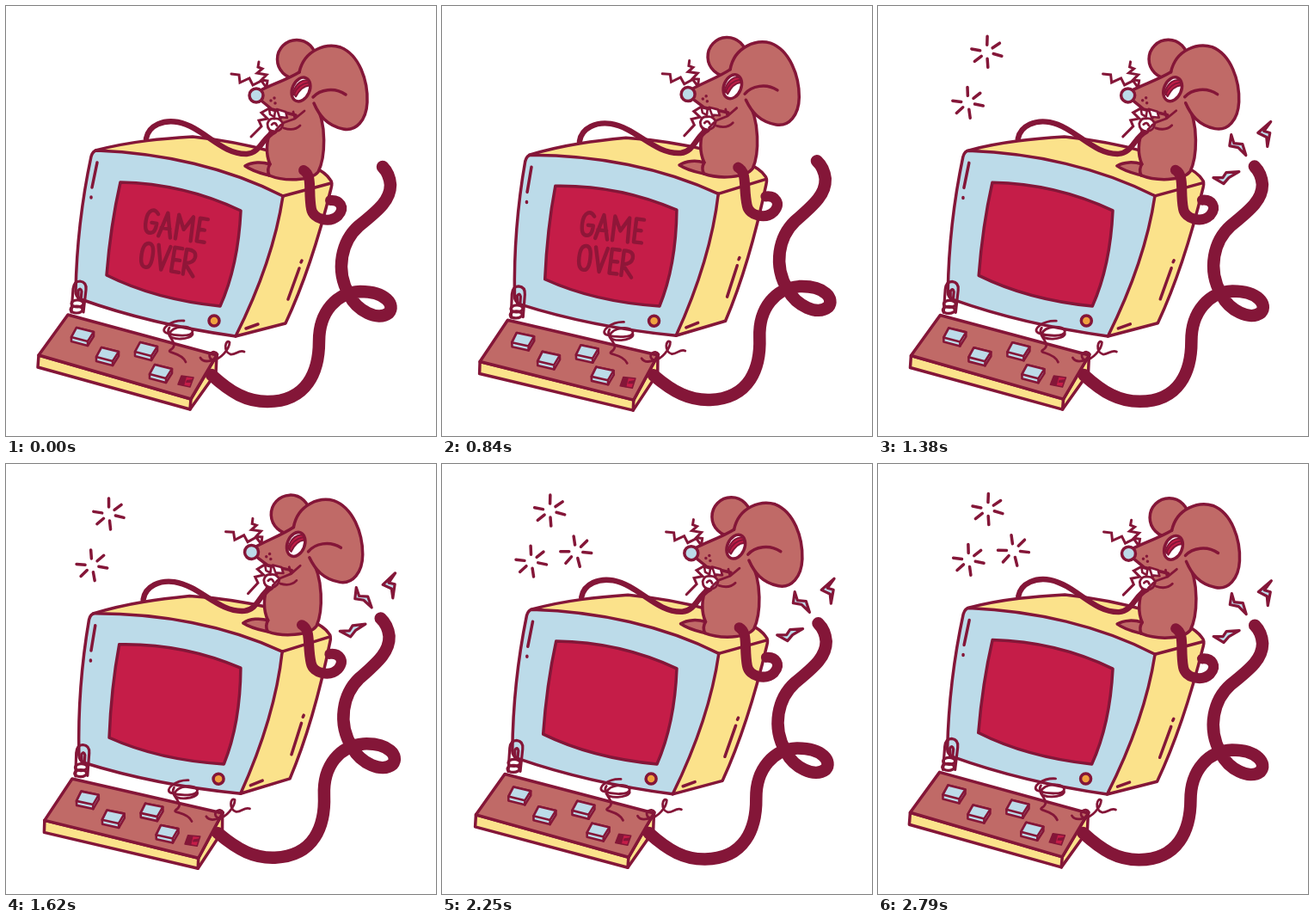
These frames come from a looping animation (500x500 px, 2820 ms). An HTML page:

```html
<!DOCTYPE html>
<html lang="en">
<head>
<meta charset="utf-8">
<title>Game over</title>
<style>
  html, body { margin: 0; width: 100%; height: 100%; overflow: hidden; background: #fff; }
  svg { display: block; width: 100vw; height: 100vh; }
  .line { fill: none; }
  .blue { fill: #bcdbe9; }
  .yellow { fill: #fbe28b; }
  .fur { fill: #c06a67; }
  .red { fill: #c51d48; }
  .white { fill: #fff; }
  .dark { fill: #841638; stroke: none; }
</style>
</head>
<body>
<svg viewBox="0 0 500 500">
<defs>
  <g id="key">
    <path class="blue" d="M-7-10L13-5V0L6 11L-13 6V1Z"/>
    <path class="blue" d="M-7-10L13-5L6 6L-13 1ZM6 6V11"/>
  </g>
  <clipPath id="cut"><path d="M-10-10H16V40H-10ZM16-10H90V24H16Z"/></clipPath>
</defs>
<g id="scene" stroke="#841638" stroke-width="3.5" stroke-linecap="round" stroke-linejoin="round">

  <!-- monitor -->
  <path class="yellow" d="M104 168C145 157 185 154 217 152C275 158 362 178 377 202Q380 205 378 212C364 269 347 322 325 369L267 384L322 221Z"/>
  <path class="line" d="M322 221L378 206"/>
  <path class="blue" d="M106 168Q101 168 99 175C89 222 82 280 81 332Q81 338 87 341C140 360 203 375 267 384C292 334 313 281 322 221C258 188 182 171 106 168Z"/>
  <path class="red" d="M133 205C184 206 231 218 273 238C271 280 263 318 249 349C200 344 155 332 117 313C120 275 125 240 133 205Z"/>
  <path class="line" d="M106 182L100 211M99 222V223M341 305L328 341M344 296L343 298M279 375L293 370"/>
  <circle cx="242" cy="366" r="6" fill="#efa23f"/>

  <!-- hand lettering -->
  <g id="words" class="line" role="img" aria-label="GAME OVER" stroke="#8f1638" stroke-width="4.4">
    <g transform="translate(165 235) rotate(9)">
      <path id="game" d="M13 5Q9 0 5 2Q0 5 0 15Q0 29 7 28Q13 28 13 16H7M17 30L24 2L31 30M19 20H29M37 30V2L45 18L54 2L55 30M71 2H62V29H71M62 15H69"/>
    </g>
    <g transform="translate(160 274) rotate(9)">
      <path id="over" d="M7 1Q0 1 0 15Q0 29 7 29Q13 29 13 15Q13 1 7 1M18 1L25 29L32 1M46 1H37V29H46M37 15H45M51 30V1Q63 0 62 9Q61 16 51 17L63 31"/>
    </g>
  </g>

  <!-- keyboard -->
  <path class="yellow" d="M38 406L215 457L245 406L244 427L214 469L37 420Z"/>
  <path class="fur" d="M72 359L245 406L215 457L38 406Z"/>
  <path class="line" d="M215 457L214 469"/>
  <g stroke-width="2.6">
    <use href="#key" x="89" y="384"/>
    <use href="#key" x="118" y="407"/>
    <use href="#key" x="163" y="401"/>
    <use href="#key" x="180" y="427"/>
  </g>
  <path class="red" stroke-width="1.6" d="M204 430L218 432L214 443L200 440Z"/>
  <path class="dark" d="M204 430L210 431L207 442L200 440ZM210 435L217 434L215 438L209 438Z"/>

  <!-- loose wires -->
  <g class="line" stroke-width="3.2">
    <path d="M76 356L78 329Q79 320 86 320Q94 321 93 330L90 356M84 341V331Q87 327 88 332L87 342"/>
    <ellipse cx="83" cy="346" rx="7" ry="4"/>
    <ellipse cx="82" cy="353" rx="7" ry="4"/>
    <path stroke-width="2.8" d="M207 366C192 365 178 376 186 380C197 384 217 385 217 378C214 370 194 372 190 381C189 390 217 388 217 381M190 374C183 384 204 392 191 400C186 404 204 402 209 414"/>
    <path stroke-width="2.8" d="M226 409C230 416 245 413 246 405C242 398 232 406 239 411C249 413 260 398 260 391C255 387 252 402 261 405C267 406 271 399 277 402"/>
  </g>
  <path class="line" stroke-width="14.5" d="M239 429C262 450 280 460 304 460C350 460 364 425 364 390C364 355 385 333 412 332C442 332 453 348 445 357C432 367 408 354 399 336C382 306 391 273 410 256C435 236 447 225 447 208Q446 195 438 187"/>

  <!-- mouse -->
  <circle class="fur" cx="338" cy="62" r="22.5"/>
  <path class="fur" d="M309 142C302 157 302 173 307 184C298 181 286 181 278 186C288 193 299 195 306 197C323 204 354 204 363 193C371 177 374 137 359 112L335 112Z"/>
  <path class="line" d="M307 184Q303 190 306 197"/>
  <path class="fur" stroke="none" d="M294 99C312 90 327 85 342 76L374 88L358 119L343 128L309 121L298 111Z"/>
  <path class="fur" d="M341 77C347 50 373 43 389 48C411 57 421 87 420 112C419 133 407 146 392 143C373 139 364 127 358 113"/>
  <path class="line" d="M296 98C310 91 328 85 341 77M357 106C365 97 382 94 395 103M298 111L309 120L337 127"/>
  <g transform="rotate(24 343 97)">
    <ellipse class="white" cx="343" cy="97" rx="10" ry="14.5"/>
    <path class="red" stroke-width="2" d="M336 104C335 92 340 85 347 84L350 89Q342 93 341 107Z"/>
    <path class="line" stroke-width="2" d="M338 106Q337 93 348 86"/>
  </g>
  <circle class="blue" cx="291" cy="104" r="8"/>
  <path class="line" d="M308 110V110M313 113V113M312 107V107"/>
  <path class="line" stroke-width="3" stroke-linejoin="miter" d="M262 79L271 80L272 89L283 84L287 92L297 87L302 94M303 94L304 87L297 86L303 80L292 78L298 73L293 71L294 65M306 119L297 124L304 131L294 133L297 140L285 152"/>
  <path class="line" stroke-width="6.4" d="M163 154C166 138 184 132 200 135C230 141 250 173 280 172C296 171 298 153 312 146"/>
  <path class="white" stroke-width="2.6" d="M315 120L325 123L327 130L318 129ZM306 120L313 122L312 129L307 126Z"/>
  <path class="white" stroke-width="2.8" d="M304 137Q306 130 312 131Q319 130 322 137Q321 145 313 146Q304 146 304 137Z"/>
  <path class="line" stroke-width="2.8" d="M309 138Q313 134 315 139M314 144L320 138M322 136L336 131L334 123M336 131L347 122M323 142Q335 146 342 139"/>
  <path class="line" stroke-width="12" d="M346 191C357 197 351 215 355 236C357 248 376 253 386 244C395 234 388 225 377 226"/>

  <!-- sparks are added here -->
  <g id="sparks" class="line"></g>
  <g id="bolts" class="blue" stroke-width="3.2">
    <path d="M457 135L442 148L452 153L453 164L456 148L449 146Z"/>
    <path d="M411 150L409 163L419 165L428 174L424 161L414 160Z"/>
    <path d="M390 200L402 207L408 200L420 193L405 194L401 200Z"/>
  </g>
</g>
</svg>
<script>
const LOOP = 2820, STEP = 30;
const $ = id => document.getElementById(id);

// sway: [time in ms, angle in degrees]
const sway = [[-30, .2], [0, 0], [540, -.9], [760, -2.5], [1080, .8], [1140, 1], [1620, -2.3],
  [1860, -4.9], [2010, -3.6], [2160, -1], [2250, -.5], [2790, .2], [2820, 0]];

const slope = i => (sway[i + 1][1] - sway[i][1]) / (sway[i + 1][0] - sway[i][0]);

// tangent that never overshoots: harmonic mean, or flat at a turning point
function tangent(i) {
  if (i === 0 || i === sway.length - 1) return 0;
  const a = slope(i - 1), b = slope(i);
  return a * b <= 0 ? 0 : 2 * a * b / (a + b);
}

function angleAt(t) {
  const i = sway.findIndex(k => k[0] > t) - 1;
  const [t0, a0] = sway[i], [t1, a1] = sway[i + 1];
  const h = t1 - t0, u = (t - t0) / h, v = 1 - u;
  return a0 * v * v * (1 + 2 * u) + a1 * u * u * (3 - 2 * u)
    + h * u * v * (tangent(i) * v - tangent(i + 1) * u);
}

// uneven ray directions in degrees
const rays = [-92, -38, 12, 82, 138, 187];

function spark(x, y, turn) {
  const d = rays.map(ray => {
    const a = (ray + turn) * Math.PI / 180, c = Math.cos(a), s = Math.sin(a);
    return `M${x + 8 * c} ${y + 8 * s}L${x + 18 * c} ${y + 18 * s}`;
  }).join('');
  const path = document.createElementNS('http://www.w3.org/2000/svg', 'path');
  path.setAttribute('d', d);
  $('sparks').append(path);
  return path;
}

spark(127, 53, 4);
spark(105, 112, 0);
const lateSpark = spark(157, 101, -6);

const show = (el, on) => el.setAttribute('visibility', on ? 'visible' : 'hidden');

function draw(now) {
  const t = Math.floor(now % LOOP / STEP) * STEP;
  const sparking = t >= 1110, glitch = t >= 1050;
  $('scene').setAttribute('transform', `rotate(${angleAt(t)} 250 240)`);
  show($('words'), !sparking);
  show($('sparks'), sparking);
  show($('bolts'), sparking);
  show(lateSpark, t >= 1650);
  $('words').setAttribute('opacity', t >= 480 && t < 600 ? .8 : 1);
  $('game').setAttribute('clip-path', glitch ? 'url(#cut)' : 'none');
  $('over').setAttribute('transform', glitch ? 'translate(-1 -3)' : '');
}

const start = performance.now();
function tick() {
  draw(performance.now() - start);
  requestAnimationFrame(tick);
}
tick();
</script>
</body>
</html>
```
